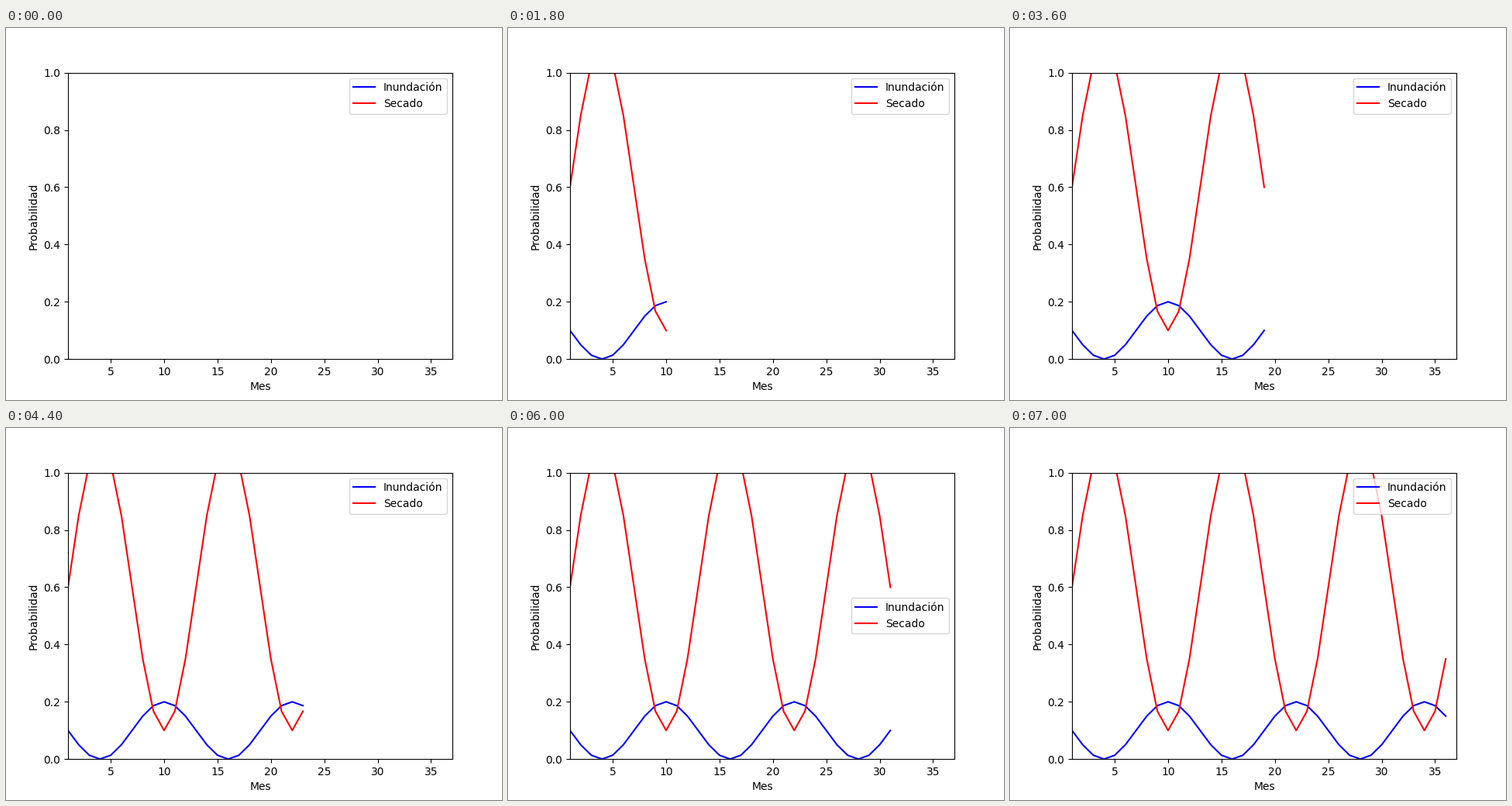
A matplotlib script that plays this animation: 640x480 px, repeating every 7200 ms.

```python
import numpy as np
import matplotlib.pyplot as plt
from matplotlib.animation import FuncAnimation

MONTHS = 36
INTERVAL = 200

months = np.arange(1, MONTHS + 1)
season = np.sin(2 * np.pi * (months - 1) / 12)
flood = 0.1 - 0.1 * season
drying = 0.6 + 0.5 * season

fig, ax = plt.subplots(figsize=(6.4, 4.8), dpi=100)
ax.set_xlim(1, MONTHS + 1)
ax.set_ylim(0, 1)
ax.set_xlabel("Mes")
ax.set_ylabel("Probabilidad")

flood_line, = ax.plot([], [], color="blue", label="Inundación")
drying_line, = ax.plot([], [], color="red", label="Secado")
# The legend moves out of the way of the growing curves.
ax.legend(loc="best")


def update(i):
    shown = slice(0, i + 1)
    flood_line.set_data(months[shown], flood[shown])
    drying_line.set_data(months[shown], drying[shown])
    return flood_line, drying_line


anim = FuncAnimation(fig, update, frames=MONTHS, interval=INTERVAL,
                     init_func=lambda: update(0), repeat=True, repeat_delay=0)
plt.show()
```
